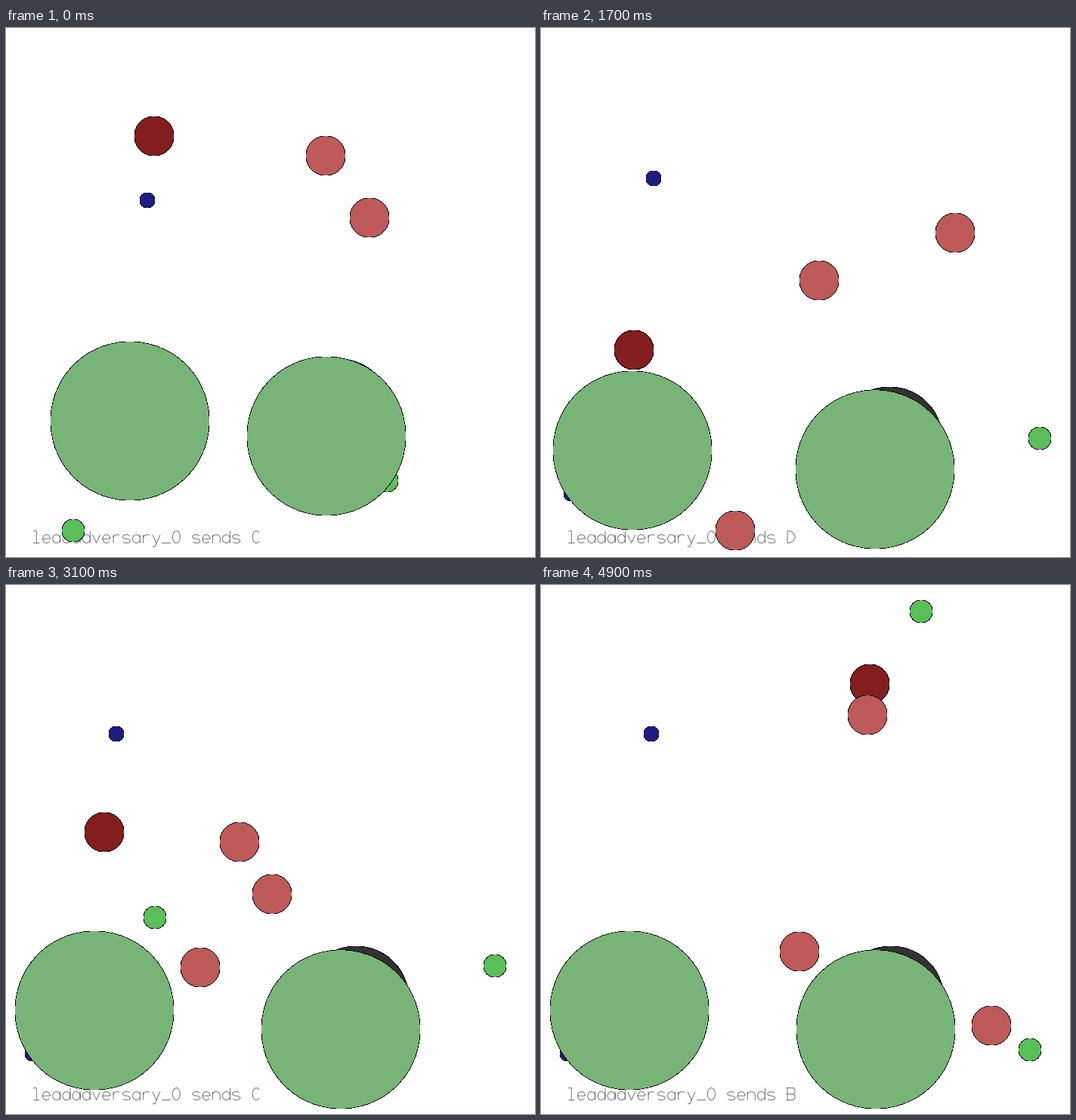
A matplotlib script for the animation above (5000 ms loop, 700 by 700 pixels).

```python
import numpy as np
import matplotlib.pyplot as plt
from matplotlib.animation import FuncAnimation
from matplotlib.patches import Circle, PathPatch
from matplotlib.path import Path

SIZE, DPI, FRAMES = 700, 100, 50
HALF, REACH = 350, 315      # the farthest body sits REACH px from the centre
RIM = 0.9

LEAD, HUNTER, PREY = (130, 30, 30), (190, 90, 90), (90, 190, 90)
ROCK, FOOD, FOREST = (50, 50, 50), (30, 30, 130), (120, 180, 120)
MESSAGES = [(0, "C"), (10, "D"), (21, "C"), (33, "A"), (47, "B")]

# All agents change course at these frames
TURNS = np.array([0, 8, 17, 25, 37, 45, 49])
CHARGE, DOWN, RIGHT = 249, (0, 1), (1, 0)


def line(*points):
    return np.array(points, float)


def bar(y, half=5):
    return line((-half, y), (half, y))


def stem(x, top, bottom=0):
    return line((x, bottom), (x, top))


def arc(ry, cy, start=0, end=360, cx=0, rx=5):
    a = np.radians(np.linspace(start, end, 25))
    return np.column_stack([cx + rx * np.cos(a), cy + ry * np.sin(a)])


# Single-stroke letters in px: x from the cell centre, y up from the baseline
GLYPHS = {
    "l": [line((-4, 16), (0, 16), (0, 0)), bar(0, 4)],
    "e": [bar(5.5), arc(5.5, 5.5, 0, 320)],
    "a": [arc(5.5, 5.5), stem(5, 11)],
    "d": [arc(5.5, 5.5), stem(5, 16)],
    "v": [line((-5, 11), (0, 0), (5, 11))],
    "r": [stem(-4, 11), arc(4, 7, 180, 50, 1)],
    "s": [arc(2.75, 8.25, 30, 270), arc(2.75, 2.75, 90, -150)],
    "y": [line((-5, 11), (0, 0)), line((5, 11), (-2, -5), (-5, -5))],
    "n": [stem(-5, 11), arc(4, 7, 180, 0), stem(5, 7)],
    "_": [bar(0, 6)],
    "0": [arc(8, 8)],
    "A": [line((-6, 0), (0, 16), (6, 0)), bar(5, 4)],
    "B": [stem(-5, 16)] + [bar(y) - (2, 0) for y in (0, 8, 16)]
         + [arc(4, y, 90, -90, 2, 3) for y in (4, 12)],
    "C": [arc(8, 8, 40, 320)],
    "D": [stem(-5, 16), arc(8, 8, 90, -90, -5, 10)],
    " ": [],
}


def text_path(text, x=40.3, baseline=681.5, advance=13.22):
    return Path.make_compound_path(*[
        Path(stroke * (1, -1) + (x + i * advance, baseline))
        for i, char in enumerate(text) for stroke in GLYPHS[char]])


def smooth(points):
    """Cubic Hermite curve through the turning points, speeding up from rest."""
    p = np.array(points, float)
    t = np.insert(TURNS, 1, TURNS[1] // 2)
    p = np.insert(p, 1, p[0] + 0.375 * (p[1] - p[0]), axis=0)
    slope = np.gradient(p, t, axis=0)
    slope[0] = 0
    frames = np.arange(FRAMES)
    k = np.clip(np.searchsorted(t, frames, side="right") - 1, 0, len(t) - 2)
    h = (t[k + 1] - t[k])[:, None]
    s = (frames - t[k])[:, None] / h
    return ((1 + 2 * s) * (1 - s) ** 2 * p[k] + s * (1 - s) ** 2 * h * slope[k]
            + s ** 2 * (3 - 2 * s) * p[k + 1] + s ** 2 * (s - 1) * h * slope[k + 1])


def charge(heading, *points):
    """A track that opens with a straight run of fixed length."""
    start = np.subtract(points[0], np.multiply(CHARGE, heading))
    return smooth([start, *points])


def fixed(x, y):
    return np.tile((float(x), float(y)), (FRAMES, 1))


# Back to front: track relative to the centre, radius, colour
BODIES = [
    (charge(DOWN, (-193, -10), (-231, 77), (-300, -123), (-85, 83),
            (94, -90), (85, -219)), 26, LEAD),
    (charge(DOWN, (91, 22), (18, -16), (30, -62), (-7, 152),
            (88, -19), (82, -178)), 26, HUNTER),
    (charge(DOWN, (164, 125), (201, -80), (22, -113), (-18, 140),
            (185, 318), (246, 233)), 26, HUNTER),
    (charge(RIGHT, (-15, 279), (-94, 320), (-123, 131), (-48, 224),
            (-14, 230), (-8, 135)), 26, HUNTER),
    (smooth([(-327, 394.5), (-50, 337), (315, 196), (298, 104), (297, 134),
             (282, -265), (153, -315)]), 15, PREY),
    (smooth([(193, 312), (-61, 351), (-215, 245), (-349, 1), (105, 255),
             (246, 345), (297, 265)]), 15, PREY),
    (fixed(113, 198), 70, ROCK),
    (fixed(-204, -153), 10, FOOD),
    (fixed(-315, 270), 10, FOOD),
    (fixed(-233, 212.6), 105, FOREST),
    (fixed(93, 238), 105, FOREST),
]

# The camera zooms so that every body stays within reach
tracks = np.array([track for track, _, _ in BODIES])
camera = np.abs(tracks).max(axis=(0, 2)) / REACH
screen = np.round(HALF + tracks / camera[None, :, None])

fig = plt.figure(figsize=(SIZE / DPI, SIZE / DPI), dpi=DPI, facecolor="white")
ax = fig.add_axes([0, 0, 1, 1])
ax.set(xlim=(0, SIZE), ylim=(SIZE, 0))
ax.axis("off")


def add_disc(radius, color, order):
    return ax.add_patch(Circle((0, 0), radius, facecolor=color, linewidth=0,
                               antialiased=False, snap=False, zorder=order))


discs = [(add_disc(radius, "black", order),
          add_disc(radius - RIM, np.divide(color, 255), order + 0.1))
         for order, (_, radius, color) in enumerate(BODIES)]

# The caption lies over the leader and under everyone else
caption = ax.add_patch(PathPatch(text_path("l"), fill=False, edgecolor="black",
                                 alpha=0.55, linewidth=72 / DPI, zorder=0.5))


def draw(frame):
    for pair, track in zip(discs, screen):
        for disc in pair:
            disc.center = track[frame]
    letter = [char for start, char in MESSAGES if start <= frame][-1]
    caption.set_path(text_path(f"leadadversary_0 sends {letter}"))
    return [disc for pair in discs for disc in pair] + [caption]


anim = FuncAnimation(fig, draw, frames=FRAMES, interval=100, repeat=True,
                     repeat_delay=0, blit=False)
plt.show()
```
